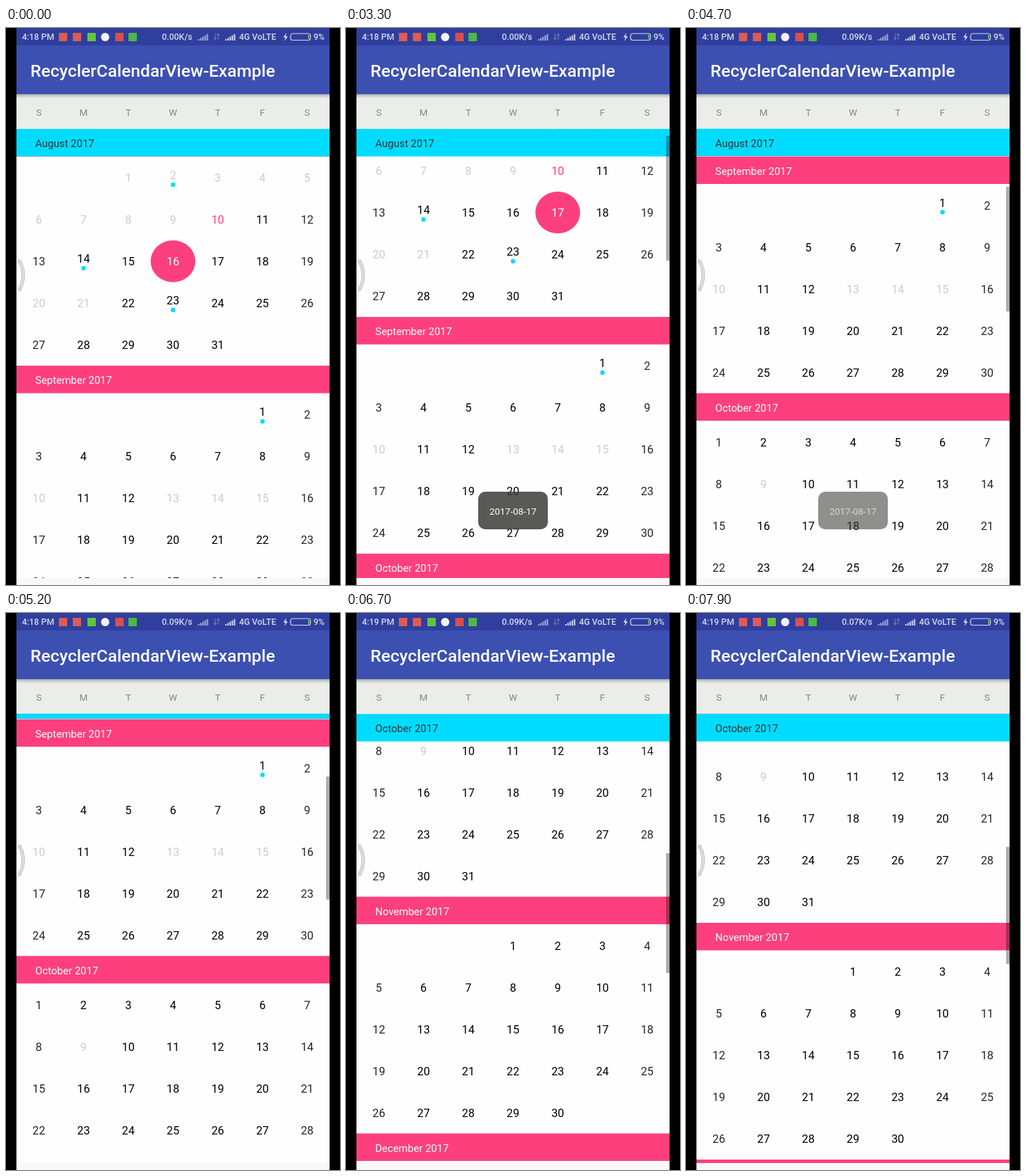
An HTML page with a canvas that plays this animation: 480 px wide and 800 px high, repeating every 8 s.

```html
<!DOCTYPE html>
<html lang="en">
<head>
<meta charset="utf-8">
<title>Calendar</title>
<style>
html, body { margin: 0; width: 100%; height: 100%; overflow: hidden; background: #000; }
canvas { display: block; width: 480px; height: 800px; }
</style>
</head>
<body>
<canvas id="c" width="480" height="800"></canvas>
<script>
const ctx = document.getElementById('c').getContext('2d');
const LOOP = 8000, STEP = 100;
const LEFT = 15, RIGHT = 465, TOP = 145, BOTTOM = 790;
const COL = (RIGHT - LEFT) / 7, ROW = 60, HEAD = 40;
const CYAN = '#00dcff', PINK = '#fd407d', PAPER = '#fdfefd';

// start: column of the first day
const months = [
  { name: 'August', start: 2, days: 31, off: [1, 2, 3, 4, 5, 6, 7, 8, 9, 20, 21], dots: [2, 14, 23], today: 10 },
  { name: 'September', start: 5, days: 30, off: [10, 13, 14, 15], dots: [1] },
  { name: 'October', start: 0, days: 31, off: [9], dots: [] },
  { name: 'November', start: 3, days: 30, off: [], dots: [] },
  { name: 'December', start: 5, days: 31, off: [], dots: [] }
];
let nextTop = TOP;
for (const m of months) {
  m.top = nextTop;
  nextTop += HEAD + ROW * Math.ceil((m.start + m.days) / 7);
}

const scrollKeys = [[3000, 0], [3300, 70], [3700, 200], [4000, 240], [4200, 240], [4700, 300.5],
  [5100, 330], [5800, 347], [6100, 347], [6400, 560], [6700, 757.5], [7100, 757.5], [7500, 735], [7900, 720]];
const thumbTop = [[0, 145], [70, 155], [300, 228], [347, 238], [720, 336], [757, 345]];
const thumbLen = [[4700, 179], [5800, 174], [6700, 172], [7900, 168]];

function lerpKeys(keys, x) {
  if (x <= keys[0][0]) return keys[0][1];
  for (let i = 1; i < keys.length; i++) {
    const [x0, y0] = keys[i - 1], [x1, y1] = keys[i];
    if (x <= x1) return y0 + (y1 - y0) * (x - x0) / (x1 - x0);
  }
  return keys[keys.length - 1][1];
}
const ramp = (t, a, b) => Math.min(1, Math.max(0, (t - a) / (b - a)));

function rect(x, y, w, h, color) {
  ctx.fillStyle = color;
  ctx.fillRect(x, y, w, h);
}
function round(x, y, w, h, r, color) {
  ctx.beginPath();
  ctx.roundRect(x, y, w, h, r);
  ctx.fillStyle = color;
  ctx.fill();
}
function oval(x, y, rx, ry, color) {
  ctx.beginPath();
  ctx.ellipse(x, y, rx, ry, 0, 0, Math.PI * 2);
  ctx.fillStyle = color;
  ctx.fill();
}
function text(s, x, base, size, color, align = 'left', weight = 400) {
  ctx.font = `${weight} ${size}px Roboto, sans-serif`;
  ctx.textAlign = align;
  ctx.fillStyle = color;
  ctx.fillText(s, x, base);
}

function monthBar(m, y, color, ink) {
  rect(LEFT, y, RIGHT - LEFT, HEAD - 0.5, color);
  text(m.name + ' 2017', 42, y + 26, 15, ink);
}

function dayCell(m, d, y, picked) {
  const cell = m.start + d - 1, col = cell % 7;
  const x = LEFT + COL * (col + 0.5);
  const cy = y + HEAD + ROW * (Math.floor(cell / 7) + 0.5);
  if (cy < TOP - ROW || cy > BOTTOM + ROW) return;
  let ink = col % 6 ? '#000' : '#25252d';
  if (m.off.includes(d)) ink = '#cbcccb';
  if (m.today === d) ink = PINK;
  if (m === months[0] && d === picked) {
    oval(x, cy, COL / 2, ROW / 2, PINK);
    ink = '#fff';
  }
  const dot = m.dots.includes(d);
  if (dot) oval(x, cy + 10, 3.2, 3.2, CYAN);
  text(d, x, cy + (dot ? 2 : 6), 16.3, ink, 'center');
}

function list(t, scroll) {
  ctx.save();
  ctx.beginPath();
  ctx.rect(LEFT, TOP - 0.5, RIGHT - LEFT, BOTTOM - TOP + 0.5);
  ctx.clip();
  const picked = t < 2600 ? 16 : 17;
  let current = 0;
  months.forEach((m, i) => {
    const y = m.top - scroll;
    if (y <= TOP) current = i;
    monthBar(m, y, PINK, '#fff');
    for (let d = 1; d <= m.days; d++) dayCell(m, d, y, picked);
  });
  const next = months[current + 1].top - scroll;
  monthBar(months[current], Math.min(TOP, next - HEAD), CYAN, '#25343a');
  ctx.globalAlpha = ramp(t, 2900, 3100);
  rect(460, lerpKeys(thumbTop, scroll), 5, lerpKeys(thumbLen, t), 'rgba(0,0,0,.32)');
  ctx.restore();
}

function bars(x, color) {
  for (let i = 0; i < 5; i++) rect(x + i * 3.1, 16 - i * 1.8, 2, 2 + i * 1.8, color);
}

function arrow(x, y0, y1, color) {
  const d = Math.sign(y1 - y0);
  ctx.beginPath();
  ctx.moveTo(x, y0);
  ctx.lineTo(x, y1);
  ctx.moveTo(x - 2, y1 - 3 * d);
  ctx.lineTo(x, y1);
  ctx.lineTo(x + 2, y1 - 3 * d);
  ctx.strokeStyle = color;
  ctx.lineWidth = 1.2;
  ctx.stroke();
}

function statusBar(t) {
  const ink = '#d3d7ee', dim = '#6874bb';
  rect(LEFT, 0, RIGHT - LEFT, 25, '#303f9d');
  text(t < 6100 ? '4:18 PM' : '4:19 PM', 23, 17, 12.4, ink, 'left', 500);
  rect(76, 7, 12, 12, '#df5a54');
  rect(96, 7, 12, 12, '#df5a54');
  rect(117, 7, 12, 12, '#62c63c');
  oval(142.5, 13, 6, 6, '#f1f4fa');
  rect(157, 7, 12, 12, '#d94f4b');
  rect(176, 7, 12, 12, '#4db847');
  const rate = t < 3900 ? '0.00' : t < 7200 ? '0.09' : '0.07';
  text(rate + 'K/s', 224, 17, 12.4, ink, 'left', 500);
  bars(276, '#a4acd6');
  const net = t >= 5700 && t < 6100 ? ink : dim;
  arrow(300.5, 8, 17, net);
  arrow(305, 17, 8, net);
  bars(315, ink);
  text('4G VoLTE', 335, 17, 12.4, ink, 'left', 500);

  ctx.beginPath();
  [[403, 7], [398.5, 13.5], [401.5, 13.5], [400, 19], [405, 12], [402, 12]].forEach(p => ctx.lineTo(...p));
  ctx.fillStyle = ink;
  ctx.fill();
  ctx.beginPath();
  ctx.roundRect(409, 8, 28.5, 9.5, 3);
  ctx.strokeStyle = ink;
  ctx.lineWidth = 1.2;
  ctx.stroke();
  rect(434, 10, 2, 5.5, '#55c05a');
  text('9%', 442, 17, 12, ink, 'left', 500);
}

function header() {
  rect(LEFT, 25, RIGHT - LEFT, 70, '#3c50b2');
  text('RecyclerCalendarView-Example', 35, 70, 24.8, '#fff', 'left', 500);
  rect(LEFT, 95, RIGHT - LEFT, 50, '#ebedea');
  const shade = ctx.createLinearGradient(0, 95, 0, 101);
  shade.addColorStop(0, 'rgba(0,0,0,.26)');
  shade.addColorStop(1, 'rgba(0,0,0,0)');
  rect(LEFT, 95, RIGHT - LEFT, 6, shade);
  [...'SMTWTFS'].forEach((s, i) => text(s, LEFT + COL * (i + 0.5), 125.5, 13.5, '#858685', 'center'));
}

function handle() {
  ctx.beginPath();
  ctx.moveTo(19.5, 335);
  ctx.quadraticCurveTo(30, 355, 19.5, 375.5);
  ctx.lineCap = 'round';
  for (const [w, color] of [[5, '#c4c5c4'], [3, '#dcdddc']]) {
    ctx.lineWidth = w;
    ctx.strokeStyle = color;
    ctx.stroke();
  }
  ctx.lineCap = 'butt';
}

function toast(t) {
  const alpha = ramp(t, 2600, 2900) * (1 - ramp(t, 4500, 5100));
  if (!alpha) return;
  ctx.globalAlpha = alpha;
  round(190, 666, 100, 54, 10, 'rgba(60,61,58,.85)');
  text('2017-08-17', 240, 699, 13.4, '#fff', 'center');
  ctx.globalAlpha = 1;
}

function draw(t) {
  rect(0, 0, 480, 800, '#000');
  rect(LEFT, TOP, RIGHT - LEFT, BOTTOM - TOP, PAPER);
  rect(LEFT, BOTTOM, RIGHT - LEFT, 10, '#f7f8f7');
  header();
  list(t, lerpKeys(scrollKeys, t));
  statusBar(t);
  handle();
  toast(t);
}

const begin = performance.now();
function tick() {
  const t = (performance.now() - begin) % LOOP;
  draw(Math.floor(t / STEP) * STEP);
  requestAnimationFrame(tick);
}
tick();
</script>
</body>
</html>
```
